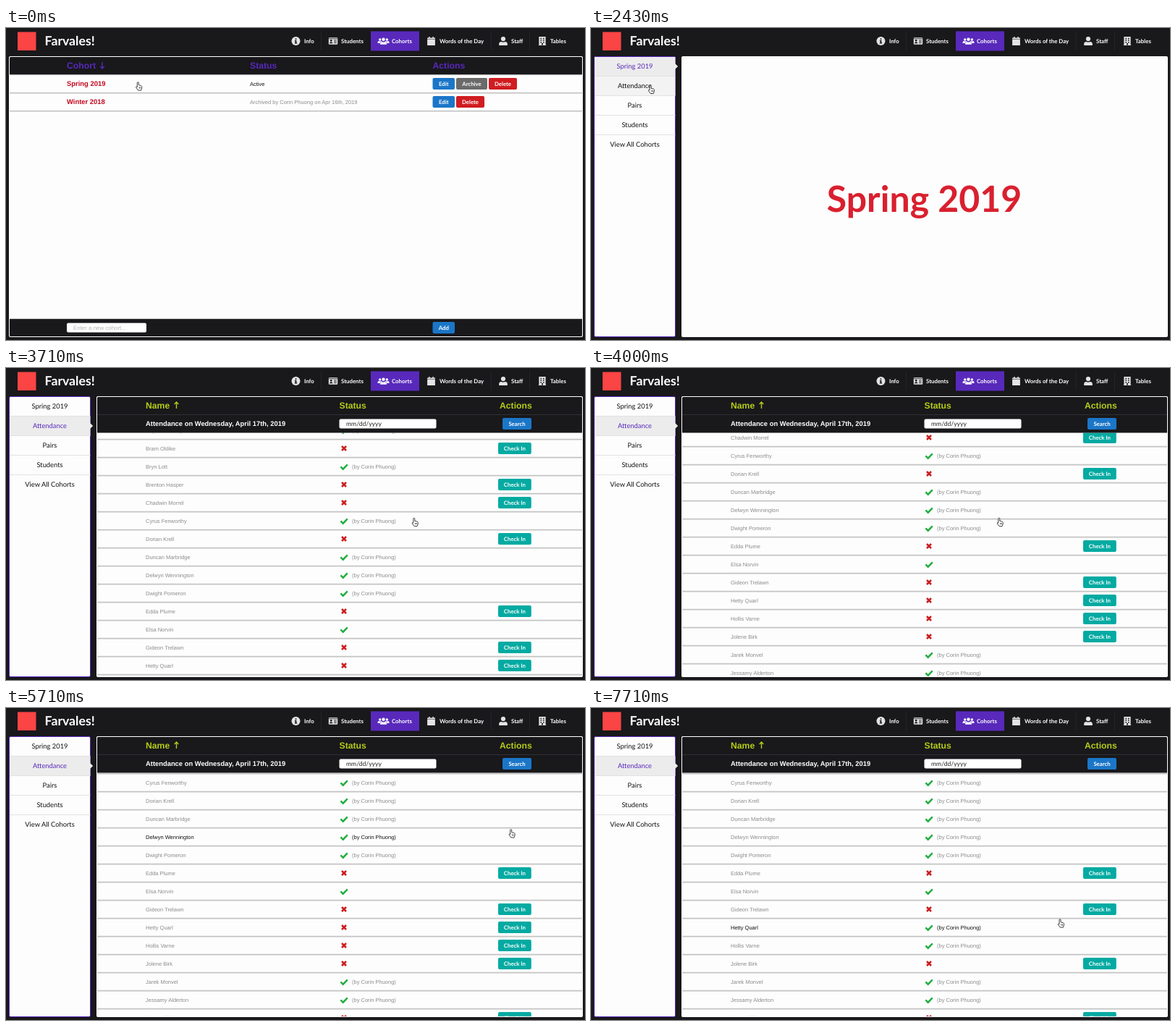
These frames come from a looping animation (800x431 px, 8000 ms). An HTML page:

```html
<!DOCTYPE html>
<html lang="en">
<head>
<meta charset="utf-8">
<title>Cohort attendance</title>
<style>
  html, body { margin: 0; width: 100%; height: 100%; overflow: hidden; background: #19181b; }
  svg { display: block; width: 100vw; height: 100vh; text-rendering: geometricPrecision; }
  text { white-space: pre; }
  .lato { font-family: Lato, sans-serif; }
  .sans { font-family: "Liberation Sans", Arial, sans-serif; }
  .bold { font-weight: 700; }
  .mid { text-anchor: middle; }
</style>
</head>
<body>
<svg id="stage" viewBox="0 0 800 431" preserveAspectRatio="none">
  <defs><clipPath id="rows"><rect x="125" y="89.5" width="671.5" height="337.5"/></clipPath></defs>
  <g id="nav"></g>
  <g id="page"></g>
  <path id="hand" fill="#fff" stroke="#111" stroke-width=".8" stroke-linejoin="round"
    d="M1.2 .2c.7 0 1.1.5 1.1 1.1v3l3.1.8c1 .3 1.5.9 1.4 1.9l-.3 2.2-.9 2.4h-4l-2.8-3.8c-.5-.8.3-1.6 1.1-1l.4.4V1.3c0-.6.4-1.1.9-1.1zM3.2 7v2M4.8 7.2v1.8"/>
</svg>
<script>
const LOOP = 8000, FPS = 7;
const DARK = '#19181b', PURPLE = '#5829bb', OLIVE = '#b5cc18';
const BLUE = '#1b76c8', RED = '#d01c20', GRAY = '#6a6a6a', TEAL = '#04aaa2';
const STAFF = 'Corin Phuong';

// Name and mark: x absent, v present, s present and signed by staff
const PEOPLE = `Abel Morston v,Amabelle Perin x,Anya Wetherby s,Bram Oldike x,Bryn Lott s,
Brenton Hasper x,Chadwin Morrel x,Cyrus Fenworthy s,Dorian Krell x,Duncan Marbridge s,
Delwyn Wennington s,Dwight Pomeron s,Edda Plume x,Elsa Norvin v,Gideon Trelawn x,
Hetty Quarl x,Hollis Varne x,Jolene Birk x,Jarek Monvel s,Jessamy Alderton s,Jovana Elms x`
  .split(',').map(s => ({ name: s.trim().slice(0, -2), mark: s.slice(-1) }));

// Row index -> time of its check-in
const CHECKED = { 8: 5290, 15: 6710, 16: 7290 };
const PAGES = [1140, 2570];
const PRESSED = [[5140, 5290], [6570, 6710], [7140, 7290]];

const POINTER = [
  [0, 181, 74.5], [140, 155, 75], [290, 134, 75], [430, 134, 75], [710, 121, 75], [1140, 121, 75],
  [2000, 80.7, 79], [2710, 80.7, 79], [3290, 562.5, 207], [4290, 562.5, 207],
  [4860, 694.3, 123.5], [5430, 694.3, 123.5], [6290, 702.7, 300], [6860, 702.7, 300],
  [7140, 702.7, 324], [7430, 702.7, 324], [7710, 646.7, 291.5], [LOOP, 646.7, 291.5]
];
const SCROLL = [
  [0, 0], [3430, 0], [3570, 18], [3710, 66], [3860, 120],
  [4000, 156], [4140, 168], [4290, 173], [4430, 174], [LOOP, 174]
];

const linear = k => k;
const smooth = k => k * k * (3 - 2 * k);

function sample(keys, t, ease) {
  const i = Math.max(1, keys.findIndex(k => k[0] > t));
  const a = keys[i - 1], b = keys[i];
  const k = ease((t - a[0]) / (b[0] - a[0]));
  return a.slice(1).map((v, n) => v + (b[n + 1] - v) * k);
}

const text = (x, y, size, fill, cls, str) =>
  `<text x="${x}" y="${y}" font-size="${size}" fill="${fill}" class="${cls}">${str}</text>`;
const rect = (x, y, w, h, fill, r = 0, extra = '') =>
  `<rect x="${x}" y="${y}" width="${w}" height="${h}" rx="${r}" fill="${fill}" ${extra}/>`;
const path = (d, fill, extra = '') => `<path d="${d}" fill="${fill}" ${extra}/>`;
const line = (d, color, width, extra = '') =>
  path(d, 'none', `stroke="${color}" stroke-width="${width}" ${extra}`);
const at = (x, y, body) => `<g transform="translate(${x} ${y})">${body}</g>`;

const button = (x, y, w, fill, label) =>
  rect(x, y - 8, w, 16, fill, 2) + text(x + w / 2, y + 2.7, 7.78, '#fff', 'lato bold mid', label);
const heading = (x, fill, label) => text(x, 56.3, 12.2, fill, 'sans bold', label);
const arrow = (x, fill, dir) =>
  at(x, 51.5, line(`M0 -4.5V4.5M-2.8 ${1.6 * dir}L0 ${4.5 * dir}L2.8 ${1.6 * dir}`, fill, 1.4));
const frame = (x, w) => rect(x + .5, 39.5, w - 1, 387, 'none', 2, 'stroke="#fff"');

// Icons are centred on their origin
const person = (x, y, s, fill) => at(x, y,
  `<g transform="scale(${s})"><circle cy="-3" r="3.1" fill="${fill}"/>` +
  path('M-5.8 6V4Q-5.8 .9 -2.6 .9Q0 2 2.6 .9Q5.8 .9 5.8 4V6Z', fill) + '</g>');
const ICON = '#e4e4e4';
const icons = {
  info: `<circle r="6" fill="${ICON}"/>` + rect(-1, -3.7, 2, 1.9, DARK, 1) +
    path('M-1.6 -.9H.9V2.2H1.7V3.4H-1.7V2.2H-.9V.2H-1.6Z', DARK),
  card: rect(-6.2, -4.8, 12.4, 9.6, ICON, 1) + rect(-6.2, -3.6, 12.4, .8, DARK) +
    `<circle cx="-2.8" cy="-.7" r="1.4" fill="${DARK}"/>` + path('M-5 3.2Q-5 1.2 -2.8 1.2Q-.6 1.2 -.6 3.2Z', DARK) +
    line('M1 -1H4.8M1 .8H4.8M1 2.6H4.8', DARK, .8),
  users: person(-4.8, -.4, .55, '#fff') + person(4.8, -.4, .55, '#fff') +
    `<g stroke="${PURPLE}" stroke-width=".6">${person(0, .2, .8, '#fff')}</g>`,
  calendar: path('M-5.4 -4.5H5.4V-2.6H-5.4ZM-5.4 -1.9H5.4V6H-5.4ZM-3.3 -6H-1.9V-4H-3.3ZM1.9 -6H3.3V-4H1.9Z', ICON),
  user: person(0, 0, 1, ICON),
  building: path('M-4.6 -6H4.6V5.2H5.2V6H-5.2V5.2H-4.6Z', ICON) +
    path('M-2.6 -4.3h1.7v1.5h-1.7zM.9 -4.3h1.7v1.5H.9zM-2.6 -1.7h1.7v1.5h-1.7zM.9 -1.7h1.7v1.5H.9zM-2.6 .9h1.7v1.5h-1.7zM.9 .9h1.7v1.5H.9zM-.9 3h1.8v2.6h-1.8z', DARK)
};
const MENU = [
  ['Info', 'info', 400.5, 412], ['Students', 'card', 452, 463], ['Cohorts', 'users', 521.5, 533],
  ['Words of the Day', 'calendar', 587.5, 599], ['Staff', 'user', 687, 698], ['Tables', 'building', 741, 752]
];
const SIDE = ['Spring 2019', 'Attendance', 'Pairs', 'Students', 'View All Cohorts'];

function nav() {
  return rect(0, 0, 800, 431, DARK) + rect(16, 5.5, 25.5, 25.5, '#fb4444') +
    text(53.6, 23.8, 17.7, '#fff', 'lato bold', 'Farvales!') +
    line('M435.5 4V31M670.5 4V31M723.5 4V31', '#242327', 1) +
    rect(504, 4.5, 67, 27, PURPLE) +
    MENU.map(([label, icon, ix, tx]) =>
      at(ix, 18, icons[icon]) + text(tx, 20.5, 7.85, '#fff', 'lato bold', label)).join('');
}

function cohortList() {
  const row = (y, name) => line(`M5 ${y + 12.7}H796`, '#c0c0c0', 1.6) +
    text(84, y + 3.3, 9.44, '#c4081f', 'sans bold', name) + button(589.5, y, 30.5, BLUE, 'Edit');
  return rect(4, 39, 793, 388, '#fdfdfd', 2) + rect(5, 40, 791, 24.5, DARK) + rect(5, 402, 791, 24.5, DARK) +
    line('M5 64.8H796M5 401.6H796', '#c0c0c0', .8) + frame(4, 793) +
    heading(84, PURPLE, 'Cohort') + arrow(133, PURPLE, 1) +
    heading(337, PURPLE, 'Status') + heading(589.5, PURPLE, 'Actions') +
    row(77, 'Spring 2019') + text(337, 79.7, 7.5, '#111', 'sans', 'Active') +
    button(622, 77, 43, GRAY, 'Archive') + button(667, 77, 39, RED, 'Delete') +
    row(102, 'Winter 2018') +
    text(337, 104.7, 7.5, '#8c8c8c', 'sans', `Archived by ${STAFF} on Apr 16th, 2019`) +
    button(622, 102, 39, RED, 'Delete') +
    rect(84, 407.5, 110, 13, '#fff', 2) +
    text(93, 417, 7.9, '#b4b4b4', 'sans', 'Enter a new cohort...') +
    button(589.5, 414, 30.5, BLUE, 'Add');
}

function sidebar(active, px, py) {
  const hover = px < 117 ? Math.floor((py - 39.5) / 27) : -1;
  const items = SIDE.map((label, i) => {
    const y = 53 + 27 * i, on = i === active;
    const fill = on ? '#ececec' : i === hover ? '#f3f3f3' : 'none';
    return rect(5, y - 13, 111.5, 26.5, fill) +
      (on ? path(`M116 ${y - 4}L120.2 ${y}L116 ${y + 4}Z`, '#ececec') : '') +
      (i < 4 ? line(`M5 ${y + 13.5}H116.5`, '#e2e2e2', 1) : '') +
      text(60.5, y + 3.3, 9.35, on ? PURPLE : '#111', 'lato mid', label);
  }).join('');
  return rect(4.5, 39.5, 112, 387, '#fdfdfd', 2, `stroke="${PURPLE}"`) + items;
}

const tick = y => line(`M462.4 ${y + .4}l3.3 3.3l6.1 -6.3`, '#1fae3f', 2.4);
const cross = y => line(`M464 ${y - 3}l6 6m0 -6l-6 6`, '#cc1f22', 2.6);

function attendance(t, px, py) {
  const [scroll] = sample(SCROLL, t, linear);
  const still = t < 3570 || t >= 4430;
  const hover = still && px > 125 && py > 89.5 ? Math.floor((py - 89.5 + scroll) / 25) : -1;
  const pressed = PRESSED.some(([a, b]) => t >= a && t < b);
  const rows = PEOPLE.map(({ name, mark }, i) => {
    const y = 102 + 25 * i;
    const m = t >= CHECKED[i] ? 's' : mark;
    const ink = i === hover ? '#111' : '#8c8c8c';
    const onButton = i === hover && px > 679 && px < 726;
    const teal = !onButton ? TEAL : pressed ? '#08807c' : '#07948d';
    return line(`M125 ${y + 12.6}H796`, '#c4c4c4', 1.6) +
      text(193, y + 2.6, 7.5, ink, 'sans', name) +
      (m === 'x' ? cross(y) + button(680, y, 45.8, teal, 'Check In') : tick(y)) +
      (m === 's' ? text(478, y + 2.6, 7.5, ink, 'sans', `(by ${STAFF})`) : '');
  }).join('');
  return rect(125, 39, 672, 388, '#fdfdfd', 2) +
    `<g clip-path="url(#rows)">${at(0, -scroll, rows)}</g>` +
    rect(126, 40, 670, 49.5, DARK) + line('M126 64.5H796', '#38373b', .8) + frame(125, 672) +
    heading(193, OLIVE, 'Name') + arrow(235.5, OLIVE, -1) +
    heading(460.5, OLIVE, 'Status') + heading(682, OLIVE, 'Actions') +
    text(193, 80.2, 9.4, '#fff', 'sans bold', 'Attendance on Wednesday, April 17th, 2019') +
    rect(460.5, 70.5, 134, 13, '#fff', 2) + text(470, 80, 8.6, '#222', 'lato', 'mm/dd/yyyy') +
    button(686, 77, 40, BLUE, 'Search');
}

const cohortHome = () => rect(125, 39, 672, 388, '#fdfdfd', 2) +
  text(460.5, 253.5, 50, '#d9202f', 'lato bold mid', 'Spring 2019');

const page = document.getElementById('page');
const hand = document.getElementById('hand');
document.getElementById('nav').innerHTML = nav();

function draw(t) {
  const [x, y] = sample(POINTER, t, smooth);
  const px = x + 1.2, py = y + 1;
  hand.setAttribute('transform', `translate(${x} ${y})`);
  page.innerHTML = t < PAGES[0] ? cohortList()
    : t < PAGES[1] ? sidebar(0, px, py) + cohortHome()
    : sidebar(1, px, py) + attendance(t, px, py);
}

let last = -1;
const start = performance.now();
function loop(now) {
  const t = Math.max(0, now - start) % LOOP;
  const step = Math.floor((t + 5) * FPS / 1000) % (LOOP * FPS / 1000);
  if (step !== last) {
    last = step;
    draw(Math.round(step * 100 / FPS) * 10);
  }
  requestAnimationFrame(loop);
}
loop(start);
</script>
</body>
</html>
```
